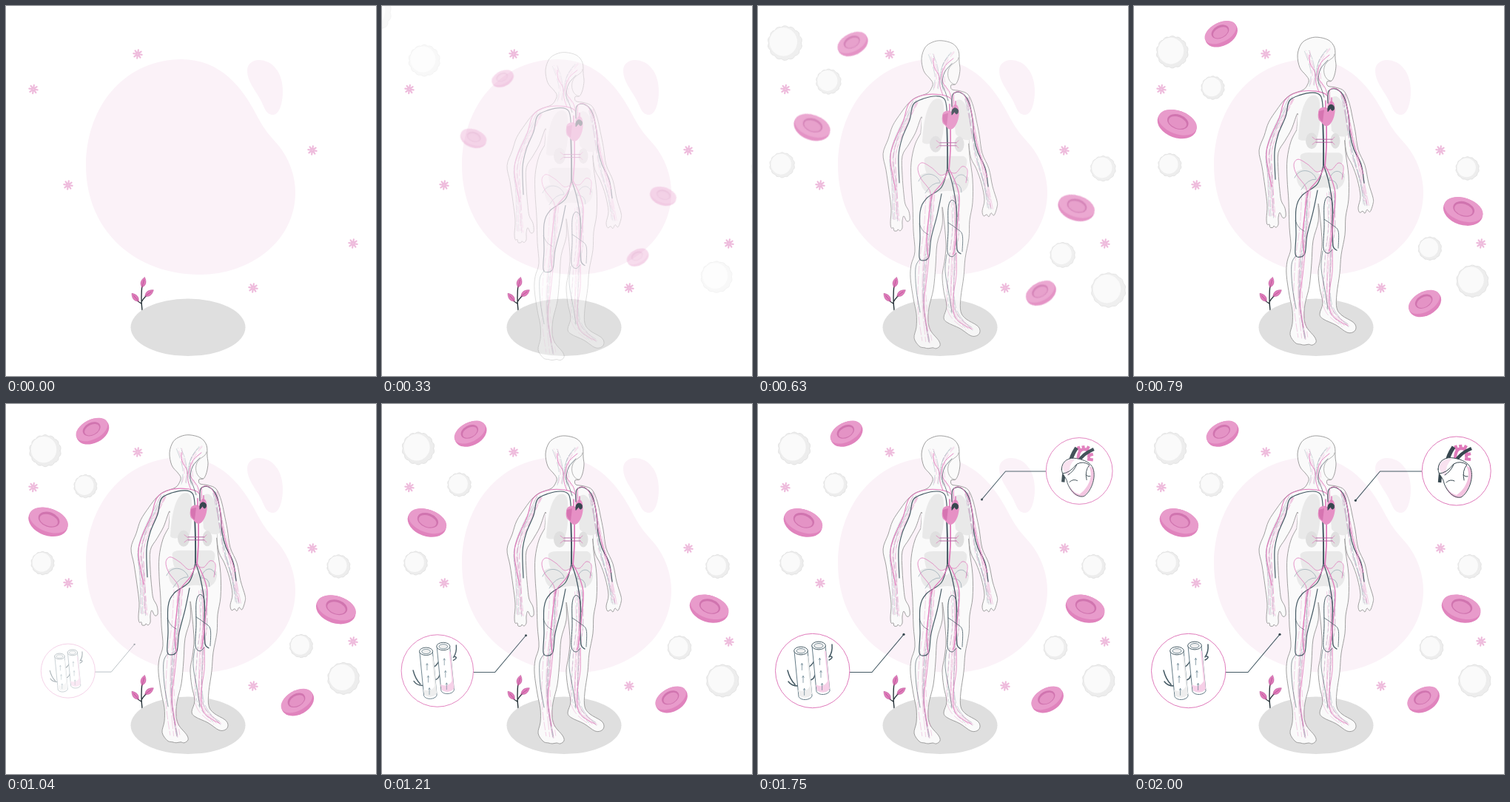
An HTML page that plays this animation: 500x500 px, repeating every 2040 ms.

```html
<!DOCTYPE html>
<html lang="en">
<head>
<meta charset="utf-8">
<title>Circulatory system</title>
<style>
html, body { margin: 0; width: 100%; height: 100%; overflow: hidden; background: #fff; }
svg { display: block; width: 100%; height: 100%; }
path, line, polyline { stroke-linecap: round; stroke-linejoin: round; }
</style>
</head>
<body>
<svg id="stage" viewBox="0 0 500 500"></svg>
<script>
const PINK = '#e07abb', DARK = '#455a64', SKIN = '#fafafa';
const LOOP = 2040;

let seed = 11;
const rand = () => (seed = seed * 16807 % 2147483647) / 2147483647;
const jitter = size => (rand() - 0.5) * 2 * size;
const parse = text => text.trim().split(/\s+/).map(p => p.split(',').map(Number));

// Smooth open curve through the given points
function curve(points) {
  const p = typeof points === 'string' ? parse(points) : points;
  let d = `M${p[0]}`;
  for (let i = 0; i < p.length - 1; i++) {
    const a = p[i - 1] || p[i], b = p[i], c = p[i + 1], e = p[i + 2] || c;
    const near = [0, 1].map(k => (b[k] + (c[k] - a[k]) / 6).toFixed(2));
    const far = [0, 1].map(k => (c[k] - (e[k] - b[k]) / 6).toFixed(2));
    d += `C${near} ${far} ${c}`;
  }
  return d;
}
const path = (d, fill, stroke = 'none', width = 1, extra = '') =>
  `<path d="${d}" fill="${fill}" stroke="${stroke}" stroke-width="${width}" ${extra}/>`;
const vein = (points, color, width, extra) => path(curve(points), 'none', color, width, extra);
const ellipse = (x, y, rx, ry, fill, extra = '') =>
  `<ellipse cx="${x}" cy="${y}" rx="${rx}" ry="${ry}" fill="${fill}" ${extra}/>`;
const group = (id, content) => `<g id="${id}">${content}</g>`;

// Bundle of thin, broken vessels along a line
function strands(points, count, spread) {
  const base = parse(points);
  let out = '';
  for (let i = 0; i < count; i++) {
    const shift = jitter(spread);
    const p = base.map(([x, y]) => [x + shift + jitter(1.8), y + jitter(2)].map(v => +v.toFixed(1)));
    out += vein(p, i % 3 ? PINK : '#78909c', 0.5,
      `stroke-dasharray="${(4 + rand() * 14).toFixed(1)} ${(1 + rand() * 4).toFixed(1)}" opacity=".65"`);
  }
  return out;
}

function flower([x, y]) {
  let d = '';
  for (let i = 0; i < 8; i++) {
    const a = i * Math.PI / 4 + 0.15, c = Math.cos(a), s = Math.sin(a);
    d += `M${x + 1.5 * c} ${y + 1.5 * s}L${x + 5.7 * c} ${y + 5.7 * s}`;
  }
  return path(d, 'none', '#eebbdc', 2.2);
}

function redCell([x, y, rx, ry, angle]) {
  return `<g transform="translate(${x} ${y}) rotate(${angle})">` +
    ellipse(0, 0.8, rx, ry, '#e083bd') +
    ellipse(0, -1.8, rx - 0.3, ry - 2.6, '#e89bcb') +
    ellipse(0, -2.6, rx * 0.54, ry * 0.54, '#d074af') +
    ellipse(0, -1.6, rx * 0.46, ry * 0.42, '#e493c5') + '</g>';
}

function whiteCell([x, y, r], index) {
  const bumps = 14, p = [];
  for (let i = 0; i <= bumps * 4; i++) {
    const a = i / (bumps * 4) * 2 * Math.PI + index;
    const q = r * (0.935 + 0.065 * Math.abs(Math.sin(a * bumps / 2)));
    p.push([(x + q * Math.cos(a)).toFixed(1), (y + q * Math.sin(a)).toFixed(1)].map(Number));
  }
  return path(curve(p), '#ededed', '#dedede', 0.8) +
    ellipse(x - r * 0.09, y - r * 0.07, r * 0.8, r * 0.82, '#fafafa');
}

function scenery() {
  const leaf = (x, y, angle) => `<g transform="translate(${x} ${y}) rotate(${angle})">` +
    path('M0 0C-5 -4 -4 -9 0 -14C4 -9 5 -4 0 0Z', PINK, '#b95c98', 0.5) +
    path('M0 0V-10', 'none', '#a34c83', 0.6) + '</g>';
  return path('M237 72C290 72 320 110 340 150C352 172 358 176 367 187C383 206 391 230 391 252C391 318 330 363 262 363C176 363 108 305 108 215C109 130 165 72 237 72Z', '#fbf2f8') +
    path('M326 87C326 78 334 73 341 73C362 73 374 92 374 115C374 130 370 147 361 147C351 147 350 138 344 127C336 112 326 102 326 87Z', '#fbf2f8') +
    parse('37,112.5 178,65 84,242 414,195 469,321 334,381').map(flower).join('') +
    path('M184 411Q182 395 184 376M183 402Q177 399 174 394M183 400Q187 393 192 390', 'none', '#263238', 1.4) +
    leaf(184, 380, 14) + leaf(179, 399, -40) + leaf(188, 392, 54) +
    ellipse(246, 434.3, 77.5, 38.8, '#dfdfdf');
}

function person() {
  const upper = '220,167 221,146 213,167 204,183 195,199 195,225 197,250 199,264 204,274 205,285 201,287 197,280 195,287 195,296 192,300 189,298 188,300 184,300 183,296 180,296 179,288 180,270 177,245 173,218 169,196 176,176 182,158 193,141 203,128 213,120 229,114 235,106 236,100 232,94 224,84 221,67 226,52 236,45 248,43 263,47 271,57 272,72 273,82 271,94 267,102 261,103 262,109 273,111 284,116 291,132 295,150 299,170 303,195 312,216 317,240 323,260 323,268 319,279 315,276 312,281 309,278 305,280 303,273 306,258 302,236 295,216 288,202 285,182 285,150';
  const trunk = '220,168 212,184 207,208 207,235 209,265 210,300 212,328 207,346 206,364 210,392 214,412 214,430 211,445 218,456 225,458 230,459 236,458 241,459 246,455 244,448 234,436 230,424 231,404 237,379 240,348 242,318 249,292 249,268 252,292 254,320 252,342 249,360 251,382 255,402 251,417 256,424 273,432 288,442 297,441 300,435 296,428 281,419 274,409 274,390 278,362 280,337 285,310 286,286 290,262 290,230 286,199 284,168';
  const grey = d => path(d, '#e9e9e9');
  const line = '#969696';
  return path(curve(trunk), SKIN, line, 0.9) + path(curve(upper), SKIN, line, 0.9) +
    path('M221 148H285V182H220Z', SKIN) +
    path('M271 66C271 73 259 73 257 84C255 93 260 102 266 102', 'none', line, 0.7) +
    // organs
    grey('M246 122C232 118 224 142 222 180C225 185 237 182 248 178Q253 160 251 132Q250 124 246 122Z') +
    grey('M268 124C281 116 287 147 289 175C284 180 274 177 267 169Q264 140 268 124Z') +
    grey('M225 207Q222 198 240 199H277Q285 201 281 214Q284 220 281 225H230Q225 220 225 207Z') +
    grey('M219 225Q234 215 255 231Q273 216 285 228Q286 245 272 249Q258 243 239 249Q219 252 219 225Z') +
    ellipse(240, 183, 8, 11, '#dfdfdf') + ellipse(272, 183, 6.5, 10.5, '#dfdfdf') +
    path('M217 233C223 219 241 221 246 234M264 235C268 221 280 221 283 232M226 249Q235 234 246 235M263 236Q275 235 275 248', 'none', '#90a4ae', 0.7) +
    // thin vessels
    strands('215,125 193,170 184,200 186,235 188,285', 9, 5) +
    strands('283,120 291,165 298,200 307,235 314,270', 8, 4) +
    strands('232,252 228,300 222,345 221,400 228,450', 9, 6) +
    strands('267,252 267,300 264,343 263,405 287,433', 9, 5) +
    strands('239,108 241,92 237,75 232,61', 4, 5) + strands('254,110 249,93 254,73 264,58', 4, 4) +
    // main vessels
    vein('255,160 255,135 252,122 242,118 225,121 210,129 205,150 195,174 190,198 191,235', DARK, 1.2) +
    vein('262,137 261,122 246,116 222,117 204,128 196,153 183,182 179,205 186,245', PINK, 1.1) +
    vein('262,132 263,116 273,113 284,124 290,150 292,175 297,194 307,215 311,240', DARK, 1.2) +
    vein('265,132 265,114 277,115 288,138 292,168 301,200 310,228', PINK, 1) +
    vein('250,117 246,105 245,92 238,78 237,67', PINK, 0.9) +
    vein('261,120 258,111 250,100 248,90 253,77 264,67', PINK, 0.9) +
    vein('257,124 253,112 249,102 252,86 262,74', DARK, 0.7) +
    vein('255,151 256,185 256,216', DARK, 2) + vein('260,155 260,190 258,218', PINK, 1.8) +
    vein('256,216 248,241 227,257 219,275 219,310 218,336 224,340 231,335 234,310 242,279 248,250', DARK, 1.2) +
    vein('258,216 249,235 235,253 231,280 228,312 230,335', PINK, 1.3) +
    vein('257,218 263,238 268,268 268,300 269,325 274,331', DARK, 1.3) +
    vein('258,216 267,235 272,255 270,285 267,315 264,332', PINK, 1.3) +
    vein('269,281 267,263 261,259 257,270 257,300 256,328 262,335 268,330', DARK, 1) +
    vein('257,289 267,296 276,305 276,328', DARK, 0.8) + vein('218,291 223,300 230,305', DARK, 0.6) +
    vein('257,220 247,225 235,215 222,208 216,215 220,229 232,245 233,257', PINK, 0.8) +
    vein('258,220 267,222 276,213 283,218 281,235', PINK, 0.8) +
    vein('219,338 213,350 214,380 219,410', DARK, 0.6) + vein('231,336 228,365 224,400 229,435', PINK, 0.8) +
    vein('255,332 253,355 258,385 262,410', DARK, 0.6) + vein('268,330 268,360 264,390 267,418 289,433', PINK, 0.8) +
    path('M246 181H268M246 185H268', 'none', '#ad5d9a', 0.9) +
    path('M246 182L241 178M246 184L241 188M267 182L271 178M267 184L271 188', 'none', PINK, 0.7) +
    // heart
    path('M249 145C249 138 257 136 261 139L264 130Q270 128 271 135C274 148 266 164 260 163C256 163 254 158 250 155Q248 151 249 145Z', '#e690c5') +
    path('M250 143Q248 153 255 158L257 141Z', '#d674b1') +
    path('M262 143Q261 135 266 134Q272 135 270 141Q267 144 266 139Z', '#37474f', '#37474f', 1) +
    path('M259 139V129M267 132V125', 'none', PINK, 1.6);
}

const callout = (x, y, r, pointer, [dx, dy]) =>
  `<polyline points="${pointer}" fill="none" stroke="${DARK}" stroke-width="1.1"/>` +
  ellipse(dx, dy, 1.6, 1.6, '#37474f') +
  ellipse(x, y, r, r, '#fff', `stroke="${PINK}" stroke-width="1"`);

function tube(x, y, tint) {
  const arrow = n => {
    const ax = x + 1.4 + n * 1.6, ay = y + 17 + n * 17;
    return `M${ax} ${ay + 9}V${ay}M${ax - 1.2} ${ay + 2}L${ax} ${ay}L${ax + 1.2} ${ay + 2}`;
  };
  return path(`M${x - 9} ${y}L${x - 3} ${y + 62}C${x} ${y + 68} ${x + 13} ${y + 67} ${x + 15} ${y + 61}L${x + 9} ${y}Z`, '#fff', '#546e7a', 0.9) +
    path(`M${x - 4} ${y + 53}L${x - 2} ${y + 61}Q${x + 7} ${y + 66} ${x + 14} ${y + 60}L${x + 13} ${y + 46}Q${x + 8} ${y + 58} ${x - 4} ${y + 53}Z`, tint) +
    path(`M${x + 9} ${y + 8}L${x + 14} ${y + 58}`, 'none', tint, 2) +
    ellipse(x, y, 9.3, 5.4, '#fff', 'stroke="#455a64" stroke-width="1"') +
    ellipse(x, y + 0.2, 6, 3.2, '#f0f0f0', 'stroke="#546e7a" stroke-width=".8"') +
    path(arrow(0) + arrow(1) + arrow(2), 'none', '#607d8b', 0.7);
}

function vessels() {
  return callout(73.7, 360.5, 50.2, '124,362.5 154,362.5 197,311.3', [197, 311.3]) +
    path('M54 381Q45 381 41 375M50 379Q43 372 40 360M96 346Q103 342 98 341M96 342Q101 335 100 325M66 356Q72 355 76 347M70 373Q75 373 77 366', 'none', '#455a64', 1.5) +
    tube(58, 333.5, '#eeeeee') + tube(82, 326.5, '#f6cfe7');
}

function heart() {
  return callout(435.7, 90.5, 46.5, '389,91 332.5,91 299.4,130.3', [299.4, 130.3]) +
    path('M434 75Q434 60 443 60Q451 61 449 72M437 63L434 56M442 61L441 55M446 62L449 56M448 69L455 67M447 74L455 75', 'none', PINK, 4.2, 'style="stroke-linecap:butt"') +
    path('M423 80Q424 70 432 58', 'none', '#37474f', 5.5, 'style="stroke-linecap:butt"') +
    path('M435 77Q440 67 456 60M414 95L413 106', 'none', '#37474f', 4.5, 'style="stroke-linecap:butt"') +
    path('M411 88C411 76 422 71 432 73C443 75 452 79 455 87C460 101 451 121 442 126C433 128 423 119 419 107C418 99 411 96 411 88Z', '#fff') +
    path('M448 82C458 97 447 116 436 123C431 122 426 119 421 110Q427 130 442 126C453 117 459 99 455 87Z', '#f3c2df') +
    path('M412 84Q414 95 422 97Q420 82 430 74Q416 73 412 84Z', '#f9e2f0') +
    path('M411 88C411 76 422 71 432 73C443 75 452 79 455 87C460 101 451 121 442 126C433 128 423 119 419 107C418 99 411 96 411 88Z', 'none', '#37474f', 1) +
    path('M412 94Q422 94 432 81Q441 76 450 82Q443 90 446 103M422 106Q427 101 433 104M432 82Q428 91 420 96M445 96Q448 99 451 98', 'none', '#37474f', 1);
}

const reds = [[119.5, 39.7, 23, 15.6, -27], [61, 159.8, 27, 18, 20], [442.2, 276, 27, 18, 18], [391, 399, 23, 15.8, -29]];
const whites = [[49, 60, 22], [104.5, 109, 16], [45.5, 215, 16], [453.5, 219.5, 16], [402, 329.3, 16], [460.3, 374, 22]];
document.getElementById('stage').innerHTML = scenery() +
  group('whites', whites.map(whiteCell).join('')) +
  group('reds', reds.map(redCell).join('')) +
  group('person', person()) + group('vessels', vessels()) + group('heart', heart());

// Cubic Bézier easing with a soft overshoot
function ease(x) {
  if (x <= 0) return 0;
  if (x >= 1) return 1;
  const bezier = (s, a, b) => 3 * (1 - s) ** 2 * s * a + 3 * (1 - s) * s * s * b + s ** 3;
  let low = 0, high = 1;
  for (let i = 0; i < 24; i++) {
    const mid = (low + high) / 2;
    if (bezier(mid, 0.36, 0.5) < x) low = mid; else high = mid;
  }
  return bezier(low, -0.01, 1.38);
}

function place(id, progress, transform) {
  const node = document.getElementById(id);
  node.setAttribute('opacity', Math.max(0, Math.min(1, progress)));
  node.setAttribute('transform', transform);
}
const zoom = (cx, cy, k) => `translate(${cx} ${cy}) scale(${k}) translate(${-cx} ${-cy})`;

function render(t) {
  const main = t < 170 ? 0 : ease((t + 22) / 1135);
  const left = ease((t - 805) / 650);
  const right = ease((t - 1350) / 650);
  place('person', main, `translate(0 ${30 * (1 - main)})`);
  place('whites', main, zoom(249, 217, 1.5 - main / 2));
  place('reds', main, zoom(252, 217, 0.5 + main / 2));
  place('vessels', left, zoom(111, 361, 0.5 + left / 2));
  place('heart', right, zoom(390.5, 90.5, 0.5 + right / 2));
}

const start = performance.now();
function tick() {
  render((performance.now() - start) % LOOP);
  requestAnimationFrame(tick);
}
tick();
</script>
</body>
</html>
```
